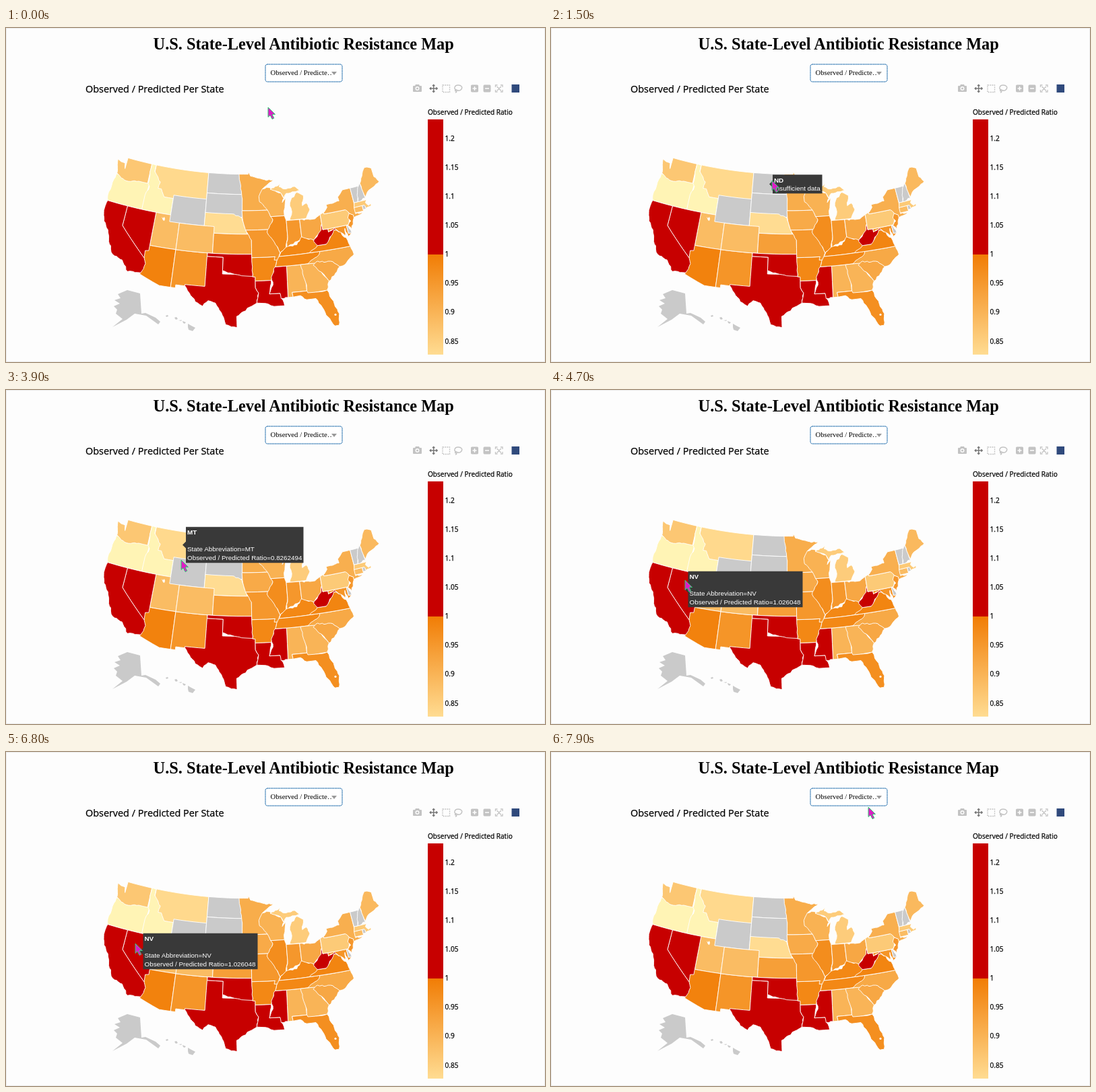
An HTML page that plays this animation: 800x497 px, repeating every 8000 ms.

```html
<!DOCTYPE html>
<html lang="en">
<head>
<meta charset="utf-8">
<title>Antibiotic Resistance Map</title>
<style>
html, body { margin: 0; width: 100%; height: 100%; overflow: hidden; background: #fdfdfd; }
svg { display: block; width: 800px; height: 497px; }
.heading { font: bold 24.35px "Liberation Serif", serif; text-anchor: middle; }
.choice { font: 10.7px "Liberation Serif", serif; }
.plot { font: 10.1px "Open Sans", sans-serif; }
.plot text { stroke: #000; stroke-width: .25; }
.plot .title { font-size: 14.4px; }
#map path { stroke: #fff; stroke-width: .9; stroke-linejoin: round; }
.tip { font: 9.85px "Liberation Sans", sans-serif; fill: #fff; visibility: hidden; }
.tip path { fill: #393939; }
.tip .name { font-weight: bold; }
#nd { animation: nd 8s step-end infinite; }
#mt { animation: mt 8s step-end infinite; }
#nv { animation: nv 8s step-end infinite; }
#cursor { animation: travel 8s ease-in-out infinite; }
@keyframes nd { 0% { visibility: hidden } 16.25% { visibility: visible } 43.75%, 100% { visibility: hidden } }
@keyframes mt { 0% { visibility: hidden } 43.75% { visibility: visible } 55%, 100% { visibility: hidden } }
@keyframes nv { 0% { visibility: hidden } 56.25% { visibility: visible } 90%, 100% { visibility: hidden } }
@keyframes travel {
  0%, 8% { transform: translate(389px, 118px) }
  18.75% { transform: translate(328px, 227px) }
  31.25%, 40% { transform: translate(315px, 230px) }
  48.75% { transform: translate(260px, 253px) }
  58.2%, 62% { transform: translate(199px, 283px) }
  75%, 88.5% { transform: translate(192px, 285px) }
  98.5%, 100% { transform: translate(471px, 82px) }
}
</style>
</head>
<body>
<svg viewBox="0 0 800 497">
  <defs>
    <linearGradient id="scale" x2="0" y2="1">
      <stop stop-color="#f17d05"/><stop offset="1" stop-color="#ffdc92"/>
    </linearGradient>
  </defs>
  <rect x=".5" y=".5" width="799" height="496" fill="#fdfdfd" stroke="#ececec"/>
  <text class="heading" x="441.7" y="31.6">U.S. State-Level Antibiotic Resistance Map</text>

  <rect x="385" y="54" width="114" height="26" rx="3" fill="#fff" stroke="#9fc0dc"/>
  <rect x="385" y="54" width="114" height="26" rx="3" fill="none" stroke="#1f6cab" stroke-dasharray="1.5 1"/>
  <text class="choice" x="392.5" y="70.3">Observed / Predicte…</text>
  <path d="M485 60h11v14h-11z" fill="#fff"/>
  <path d="M483 65h8l-4 5z" fill="#999"/>

  <g fill="#c3c3c3" stroke="#c3c3c3">
    <path stroke="none" fill-rule="evenodd" d="M604 87q0-1 1-1h2l1-2h5l1 2h2q1 0 1 1v7q0 1-1 1h-11q-1 0-1-1zM607.5 90a3 3 0 1 0 6 0a3 3 0 1 0-6 0"/>
    <circle cx="610.5" cy="90" r="1.6" stroke="none"/>
    <path fill="none" stroke="#777" stroke-width="1.4" d="M629.5 90h10.5M634.7 84.8v10.5M633 86.3l1.7-1.8 1.7 1.8M633 93.8l1.7 1.8 1.7-1.8M631 88.3l-1.8 1.7 1.8 1.7M638.4 88.3l1.8 1.7-1.8 1.7"/>
    <rect x="648" y="85" width="10.5" height="10.5" fill="none" stroke-width="1.3" stroke-dasharray="2 1.2"/>
    <path fill="none" stroke-width="1.4" d="M668 92c-4-2-2-7 3-7s7 3 5 6-6 2-8 1c-2 0-2 2 0 2s0 2-1 2"/>
    <rect x="690.5" y="85" width="10" height="10" rx="1"/>
    <rect x="709" y="85" width="10" height="10" rx="1"/>
    <path stroke="#fdfdfd" stroke-width="1.6" d="M692.5 90h6M695.5 87v6M711 90h6"/>
    <path fill="none" stroke-width="1.3" d="M726.5 88v-3h3M734 85h3v3M737 92v3h-3M729.5 95h-3v-3M728.5 87l6.5 6.5M735 87l-6.5 6.5"/>
  </g>
  <rect x="750.5" y="84" width="11.5" height="12" fill="#304a7c"/>

  <g id="plot" class="plot">
    <text class="title" x="118" y="96">Observed / Predicted Per State</text>
    <text x="626" y="129">Observed / Predicted Ratio</text>
    <path d="M626 136h23v201h-23z" fill="#c70000"/>
    <path d="M626 337h23v149h-23z" fill="url(#scale)"/>
  </g>

  <g id="map"></g>
  <g fill="#cacaca">
    <path d="M180 390L199 395 201 425 207 424 222 431 229 437 226 441 208 428 191 425 179 434 158 445 173 433 163 425 165 419 160 414 169 410 161 405 170 402 166 396z"/>
    <path d="M237 428l3-1 1 2-3 1zM250 431l3-1 2 3-3 1zM256 435l5-.5-1 1.5zM262 436l5 2-2 2-2-1zM270 440l5 3 6 3-4 5-6-2-1-4z"/>
  </g>
  <path d="M231 281l2 2 2-2 1 3-1 3-2-1z" fill="#fff"/>
  <circle cx="489" cy="426.5" r="1.6" fill="#fff"/>

  <g id="tips"></g>
  <path id="cursor" d="M0 0V14.5L3.2 11.7 6 17.5 8.8 16.2 6 10.5H10.5z" fill="#df1cc6" stroke="#2fd071"/>
</svg>
<script>
// Ratio and key points in degrees west and north; two points span a rectangle.
// Later states cover the rough edges of earlier ones.
const states = {
  OR: [.775, '124.1 46.2 116.6 46.2 117 42 124.2 42 124.5 42.8'],
  WA: [.86, '124.7 48.4 122.9 48.1 122.6 47.3 122.6 49 117.03 49 117.03 46 119 46 121.2 45.6 122.8 45.8 124 46.3'],
  MT: [.826, '116 49 104.05 44.4'],
  ID: [.775, '117.03 49 116.05 49 116.05 48 114.4 46.6 114.6 45.6 113.9 45.6 113 44.5 111.05 44.5 111.05 42 117.03 42 117.03 44.2 116.5 45.6 116.92 46'],
  UT: [.88, '114.05 42 109.05 37'],
  WY: [null, '111.05 45 104.05 41'],
  AZ: [.99, '114.8 37 109.05 37 109.05 31.33 111.07 31.33 114.81 32.5'],
  NV: [1.03, '120 42 114.05 42 114.05 36.2 114.7 36.1 114.63 35 120 39'],
  CA: [1.1, '124.2 42 120 42 120 39 114.63 35 114.2 34.2 114.72 32.72 117.1 32.5 118.5 34 120.5 34.5 121.9 36.6 122.5 37.8 123.7 38.9 124.35 40.4'],
  NM: [.955, '109.05 37 103 37 103 32 106.6 31.8 108.2 31.8 108.2 31.33 109.05 31.33'],
  TX: [1.1, '103.04 36.5 100 36.5 100 34 94 34 94.04 32 93.5 31.2 93.84 29.7 95.1 29.1 97.3 27.7 97.2 26 99.1 26.4 99.5 27.5 101 29.6 102.3 29.9 103.15 29 104.5 29.6 106.55 31.8 106.6 32 103.04 32'],
  ND: [null, '104.05 49 96.6 45.94'],
  SD: [null, '104.05 45.94 96.45 42.5'],
  NE: [.82, '104.05 43 98.5 43 96.5 42.4 95.4 40 104.05 40 104.05 41'],
  CO: [.88, '109.05 41 102.05 37'],
  KS: [.935, '102.05 40 94.62 37'],
  OK: [1.1, '103 37 94.62 37 94.43 35.4 94.48 33.7 96.5 33.8 98.2 34.1 100 34.5 100 36.5 103 36.5'],
  MN: [.91, '97.2 49 95.15 49 95.15 49.4 94.6 48.7 91.5 48.1 89.6 48 92.1 46.7 91.2 43.5 96.45 43.5 96.45 45.3 96.6 46'],
  IA: [.915, '96.5 43.5 91.2 43.5 90.2 42 91 40.6 95.77 40.6 96.4 42.4'],
  AR: [.98, '94.6 36.5 89.7 36.5 91.17 33 94.04 33 94.04 33.6 94.48 33.6'],
  MO: [.95, '95.77 40.6 91 40.6 89.2 37 89.7 36 90.4 36 90.2 36.5 94.62 36.5 94.62 39.1'],
  WI: [.9, '92.1 46.7 90.8 46.9 88.1 45.9 87.6 45.1 88 44.5 87.2 45.1 87.8 43.2 87.8 42.5 90.65 42.5 91.2 43.5 92.8 44.8 92.9 45.6'],
  IL: [.97, '90.6 42.5 87.8 42.5 87.5 41.7 87.53 39.3 88 37.7 89.2 37 90.2 38.7 91.5 40.2 91.1 40.8 90.2 42'],
  LA: [1.1, '94.04 33 91.17 33 91.6 31 89.73 31 89.5 30.2 89.1 29.1 90.9 29.1 92.3 29.6 93.84 29.7 93.5 31.2 94.04 32'],
  AL: [.895, '88.2 35 85 35 85 31 87.6 31 87.5 30.3 88.4 30.3'],
  MS: [1.1, '88.2 35 90.3 35 91.1 33.5 90.9 32.3 91.6 31 89.73 31 89.6 30.2 88.4 30.3'],
  MI: [.85, '86.8 41.76 83.45 41.73 82.45 43 83 44 83.9 43.7 83.4 45.2 84.75 45.8 86.2 44.7 86.5 43.9 86.2 43;90.4 46.6 88 47.4 88.4 46.9 87.4 46.5 85 46.7 84 46 87 45.8 87.6 45.1 88.1 45.9'],
  IN: [.95, '87.5 41.75 84.8 41.7 84.8 38.9 88 37.7 87.53 39.3'],
  OH: [.92, '84.8 41.7 82.7 41.5 81.7 41.5 80.52 42 80.52 40.6 80.8 39.6 82.5 38.4 84.8 38.9'],
  KY: [.98, '89.5 36.5 82 36.6 82 38 82.6 38.4 84 38.8 84.8 39.1 85.9 38 88 37.8 89.1 37.1'],
  TN: [.98, '89.5 36.5 81.7 36.6 82 35 90.3 35'],
  GA: [.895, '85.6 35 83 35 82 33.5 80.9 32 81.45 30.7 84.9 30.6 85.05 32.3'],
  FL: [.965, '87.6 31 85 31 84.86 30.7 82.2 30.6 81.45 30.7 80.6 28.4 80.05 26.9 80.4 25.2 81.1 25.2 82.1 26.8 82.7 28.2 83.6 29.7 85.2 29.7 86.2 30.4 87.5 30.3'],
  NC: [.917, '84.3 35 79.7 34.8 78.55 33.87 77.95 33.9 76.6 34.7 75.55 35.25 75.87 36.55 81.7 36.58 82 36.1'],
  SC: [.92, '83.3 34.7 82.4 35.2 80.8 34.9 79.7 34.8 78.55 33.87 79.2 33.2 80.9 32 82 33.5'],
  VA: [.985, '83.68 36.6 75.9 36.55 76.3 37.9 77 38.4 77.1 38.9 78.35 39.4 80.3 37.5 82 37.5'],
  WV: [1.1, '82.6 38.2 82 37.5 80.3 37.5 78.35 39.4 77.8 39.3 78.2 39.65 79.48 39.3 79.48 39.72 80.52 39.72 80.52 40.63 80.85 39.7 82.2 38.6'],
  MD: [.955, '79.48 39.72 75.79 39.72 75.7 38.46 75.05 38.45 75.9 38 76.2 39.3 76.4 38.2 77.05 38.8 77.8 39.3 78.2 39.65 79.48 39.2'],
  DE: [null, '75.79 39.8 75.5 39.5 75.05 38.45 75.7 38.46'],
  PA: [.855, '80.52 42 79.76 42.2 79.76 42 75 42 74.6 41 75.4 39.72 80.52 39.72'],
  NJ: [.95, '75.5 39.6 74.75 40.2 75.2 40.7 74.7 41.36 73.9 41 74.1 40.4 74.9 39'],
  NY: [.905, '79.76 42.2 78.9 42.9 79 43.3 76.2 43.5 76.3 44.1 75 45 73.35 45 73.3 42.7 73.5 41.1 72 41 74 40.6 74 41 74.7 41.36 75.35 42 79.76 42'],
  CT: [.88, '73.5 42.03 71.8 41.2'],
  RI: [null, '71.8 42.02 71.2 41.4'],
  MA: [.855, '73.27 42.72 70.6 42.7 71 42.3 70.5 41.8 70 42 70 41.7 71.2 41.5 71.38 42.02 73.5 42.03'],
  VT: [null, '73.35 45 71.5 45 72.46 42.73 73.27 42.73'],
  NH: [null, '71.5 45 71.1 45.3 70.75 43 72.46 42.73 72.05 44.1'],
  ME: [.887, '71.08 45.3 70 46.7 69.2 47.45 67.8 47.07 67.8 45.7 67 44.8 70 43.8 70.7 43.1']
};

function color(ratio) {
  if (ratio === null) return '#cacaca';
  if (ratio > 1) return '#c70000';
  const t = (1 - ratio) / .18;
  return `rgb(${241 + 14 * t}, ${125 + 95 * t}, ${5 + 141 * t})`;
}

const rad = Math.PI / 180;
const sinA = Math.sin(29.5 * rad), sinB = Math.sin(45.5 * rad);
const cone = (sinA + sinB) / 2, offset = 1 + sinA * sinB;

// Albers equal-area conic projection
function project(west, north) {
  const radius = 567 * Math.sqrt(offset - 2 * cone * Math.sin(north * rad)) / cone;
  const angle = cone * (96 - west) * rad;
  return (353.8 + radius * Math.sin(angle)).toFixed(1) + ' ' + (radius * Math.cos(angle) - 407.2).toFixed(1);
}

let seed = 7;
const jitter = () => (seed = seed * 16807 % 2147483647) / 2147483647 - .5;

function corners(ring) {
  const n = ring.split(' ').map(Number);
  if (n.length === 4) return [[n[0], n[1]], [n[2], n[1]], [n[2], n[3]], [n[0], n[3]]];
  return Array.from({ length: n.length / 2 }, (_, i) => [n[2 * i], n[2 * i + 1]]);
}

// Surveyed borders stay straight; rivers and coasts get a slight wobble.
function outline(ring) {
  const points = [];
  corners(ring).forEach(([x, y], i, all) => {
    const [nextX, nextY] = all[(i + 1) % all.length];
    const dx = nextX - x, dy = nextY - y, length = Math.hypot(dx, dy);
    const surveyed = Math.min(Math.abs(dx), Math.abs(dy)) < .1 || length > 3.8;
    const steps = Math.ceil(length / (surveyed ? 1.5 : .5));
    for (let s = 0; s < steps; s++) {
      const wobble = s && !surveyed ? .2 : 0;
      points.push(project(x + dx * s / steps + wobble * jitter(), y + dy * s / steps + wobble * jitter()));
    }
  });
  return 'M' + points.join('L') + 'Z';
}

const byId = id => document.getElementById(id);

byId('map').innerHTML = Object.values(states).map(([ratio, rings]) =>
  `<path fill="${color(ratio)}" d="${rings.split(';').map(outline).join('')}"/>`).join('');

for (let i = 0; i < 8; i++) {
  const label = +(1.2 - i * .05).toFixed(2);
  byId('plot').insertAdjacentHTML('beforeend', `<text x="651.5" y="${167.8 + i * 43.1}">${label}</text>`);
}

function tip(name, x, y, w, h, lines) {
  const text = lines.map((line, i) =>
    `<text x="${x + 2}" y="${y + h - 4.6 - 12.6 * (lines.length - 1 - i)}">${line}</text>`).join('');
  return `<g id="${name.toLowerCase()}" class="tip">
    <path d="M${x} ${y}h${w}v${h}h${-w}v${5 - h / 2}l-5 -5l5 -5z"/>
    <text class="name" x="${x + 2}" y="${y + 11.3}">${name}</text>${text}</g>`;
}

const details = (name, value) => [`State Abbreviation=${name}`, `Observed / Predicted Ratio=${value}`];
byId('tips').innerHTML =
  tip('ND', 329, 218.3, 73.5, 28, ['Insufficient data']) +
  tip('MT', 267, 203.7, 174.5, 53.5, details('MT', '0.8262494')) +
  tip('NV', 203.5, 269.7, 170, 53.5, details('NV', '1.026048'));
</script>
</body>
</html>
```
